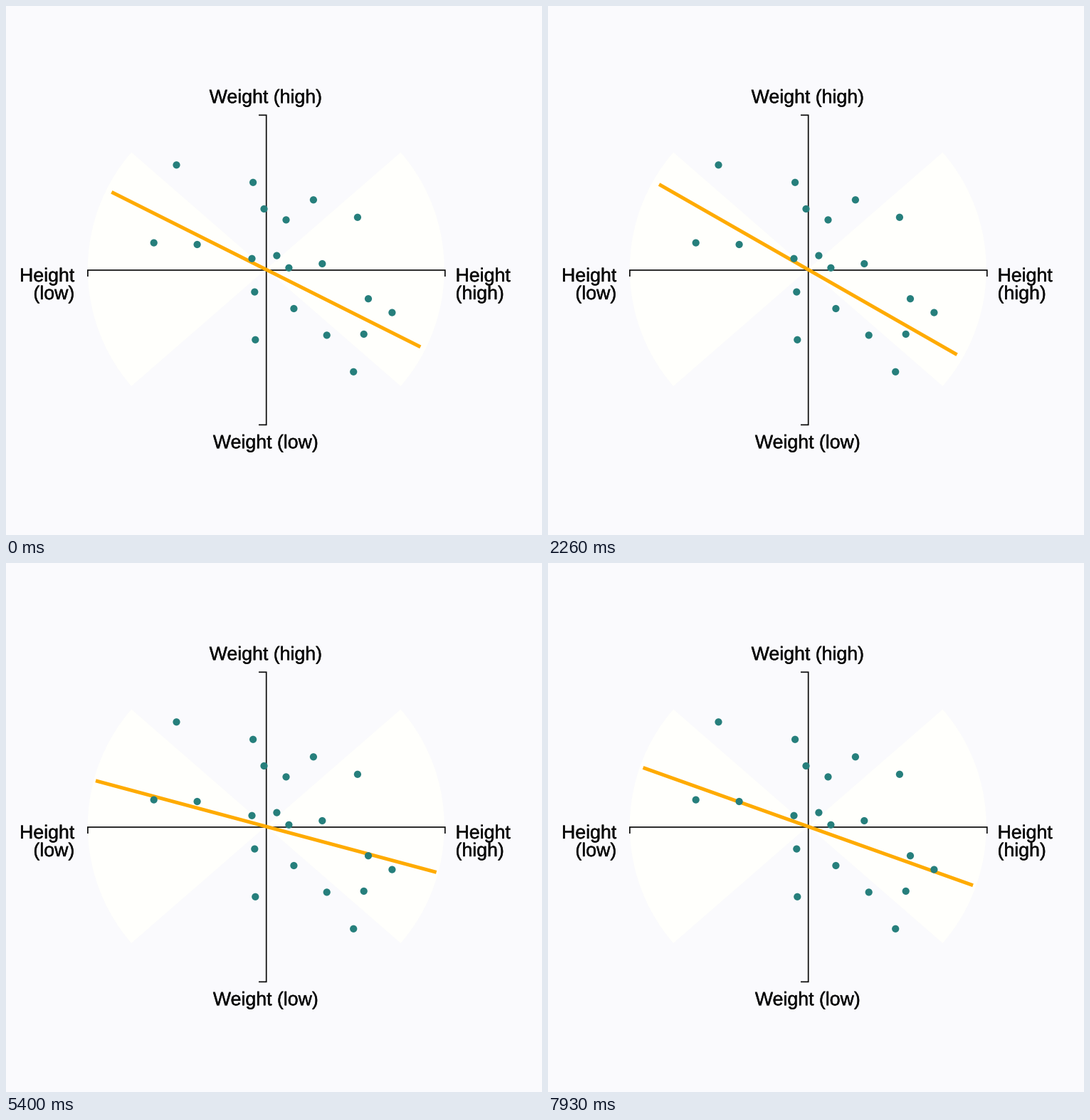
Write a matplotlib script that moves like this. It is 753 px wide and 743 px high and loops after 8000 ms.

```python
import numpy as np
import matplotlib.pyplot as plt
from matplotlib.animation import FuncAnimation
from matplotlib.patches import Circle, Wedge
from matplotlib.patheffects import withStroke

W, H, DPI = 753, 743, 100
FRAMES, INTERVAL = 320, 25
PX = 72 / DPI

CX, CY = 365.3, 370.1
RX, RY = 250.5, 217.5
INK = "#0a0a0a"

# The line eases to the next key angle (degrees) every half second.
STEP, DELAY, DURATION = 500, 145, 300
KEYS = [30, 20.6, 14.8, 22.4, 33.8, 32, 26.7, 26.4, 18.3,
        10.7, 17, 17.2, 15, 16.4, 19.4, 14.6, 22.4]

plt.rcParams["font.family"] = "Liberation Sans"

fig = plt.figure(figsize=(W / DPI, H / DPI), dpi=DPI, facecolor="#fafafd")
ax = fig.add_axes([0, 0, 1, 1])
ax.set_xlim(0, W)
ax.set_ylim(H, 0)
ax.axis("off")


def stroke(xs, ys, color=INK, width=1.7, z=2):
    line, = ax.plot(xs, ys, color=color, lw=width * PX, zorder=z, snap=False,
                    solid_capstyle="butt", solid_joinstyle="miter")
    return line


def label(x, y, lines, align):
    for i, text in enumerate(lines):
        ax.text(x, y + 25 * i, text, size=26.7 * PX, color=INK, ha=align,
                va="baseline", path_effects=[withStroke(linewidth=0.3, foreground=INK)])


def sweep(n, start, step, bend):
    """Points along a parabola: start + step*k + bend*k^2."""
    k = np.arange(n)[:, None]
    return np.array(start) + np.array(step) * k + np.array(bend) * k ** 2


def ease(p):
    return 2 * p * p if p < 0.5 else 1 - 2 * (1 - p) ** 2


def angle_at(ms):
    i, local = divmod(ms, STEP)
    p = ease(min(max((local - DELAY) / DURATION, 0), 1))
    return np.radians(KEYS[i] + (KEYS[i + 1] - KEYS[i]) * p)


# Shaded sectors
spread = np.degrees(np.arctan2(RY, RX))
for mid in (0, 180):
    ax.add_patch(Wedge((CX, CY - 0.4), RX, mid - spread, mid + spread,
                       fc="#fffffc", ec="none", zorder=1))

# Axes with end ticks
top, bottom, left, right = 153.3, 588.3, 114.9, 616.8
stroke([355, 365.7, 365.7, 355], [top, top, bottom, bottom])
stroke([left, left, right, right], [380, 371, 371, 380])

label(364.8, 136.2, ["Weight (high)"], "center")
label(364.8, 621.2, ["Weight (low)"], "center")
label(96.3, 387, ["Height", "(low)"], "right")
label(631.5, 387, ["Height", "(high)"], "left")

# Two curved rows of dots, the rest scattered around the centre
upper = sweep(4, (239.5, 223.3), (119, 24.5), (-11.4, 0))
lower = sweep(4, (349.3, 401.6), (59.5, 16.4), (-4.4, 7))
loose = [(362.5, 285), (393.5, 300.4), (207.7, 332.6), (268.6, 335),
         (345.5, 354.8), (380.4, 350.6), (397.4, 367.8), (444.3, 362),
         (350.3, 468.8), (502.7, 460.9), (509, 411.2), (542.4, 430.6)]
for dot in (*upper, *lower, *loose):
    ax.add_patch(Circle(dot, 5.1, fc="#267f7c", ec="none", zorder=4))

fit = stroke([], [], "#ffab00", 5, 3)


def update(frame):
    theta = angle_at(frame * INTERVAL)
    dx, dy = RX * np.cos(theta), RY * np.sin(theta)
    fit.set_data([CX - dx, CX + dx], [CY - dy, CY + dy])
    return fit,


anim = FuncAnimation(fig, update, frames=FRAMES, interval=INTERVAL,
                     repeat=True, repeat_delay=0, blit=False)
plt.show()
```
